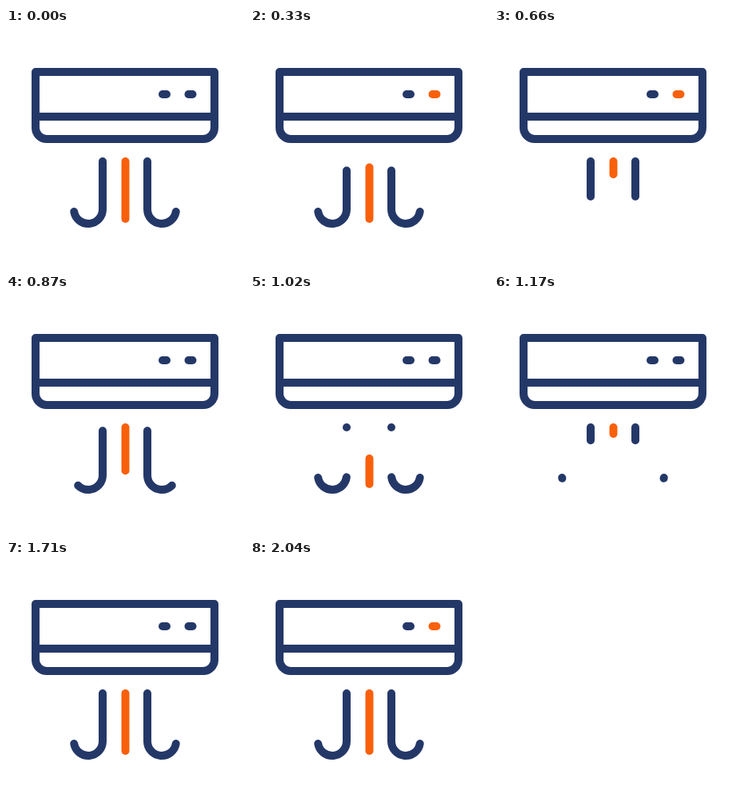
Write an HTML page that moves like this. It is 298 by 298 pixels and loops after 2250 ms.

```html
<!DOCTYPE html>
<html lang="en">
<head>
<meta charset="utf-8">
<title>Air conditioner</title>
<style>
  html, body { margin: 0; height: 100%; overflow: hidden; background: #fff; }
  svg { display: block; width: 100%; height: 100%; }
  path { fill: none; stroke: #243868; stroke-width: 10; stroke-linecap: round; stroke-linejoin: round; }
  .warm { stroke: #f8600c; }
</style>
</head>
<body>
<svg viewBox="0 0 298 298">
  <path d="M37 55H261V125A14 14 0 0 1 247 139H51A14 14 0 0 1 37 125Z M37 111H261"/>
  <path d="M196 83H201"/>
  <path id="led" d="M228.5 83H233.5"/>
  <g id="air"></g>
</svg>
<script>
const LOOP = 2250;
const LED_ON = [[320, 850], [1180, 1710], [2040, LOOP]];

// Each wave shows the stretch of a stream between its tail and its head.
// Tail and head are [start, end] times of an eased run along the stream.
const DONE = [-2, -1], NEVER = [LOOP, LOOP + 1];
const hookWaves = [
  { tail: [245, 660], head: DONE },
  { tail: [826, 1192], head: [417, 986] },
  { tail: NEVER, head: [1020, 1630] }
];
const middleWaves = [
  { tail: [245, 657], head: DONE },
  { tail: [868, 1158], head: [475, 1067] },
  { tail: NEVER, head: [1043, 1630] }
];

const led = document.getElementById("led");
const air = document.getElementById("air");
const pieces = [];

function addStream(d, waves, className = "") {
  for (const wave of waves) {
    const path = document.createElementNS("http://www.w3.org/2000/svg", "path");
    path.setAttribute("d", d);
    path.setAttribute("pathLength", 1);
    path.setAttribute("class", className);
    air.append(path);
    pieces.push({ path, ...wave });
  }
}

addStream("M121 167V227A18 18 0 0 1 85.25 230", hookWaves);
addStream("M177 167V227A18 18 0 0 0 212.75 230", hookWaves);
addStream("M149.5 167V239", middleWaves, "warm");

function progress(t, [start, end]) {
  const x = Math.min(1, Math.max(0, (t - start) / (end - start)));
  return (1 - Math.cos(Math.PI * x)) / 2;
}

function draw(t) {
  const lit = LED_ON.some(([on, off]) => t >= on && t < off);
  led.setAttribute("class", lit ? "warm" : "");
  for (const { path, tail, head } of pieces) {
    const from = progress(t, tail), to = progress(t, head);
    path.style.display = to > from ? "" : "none";
    path.setAttribute("stroke-dasharray", `${to - from} 2`);
    path.setAttribute("stroke-dashoffset", -from);
  }
}

const begin = performance.now();
function tick() {
  draw((performance.now() - begin) % LOOP);
  requestAnimationFrame(tick);
}
tick();
</script>
</body>
</html>
```
